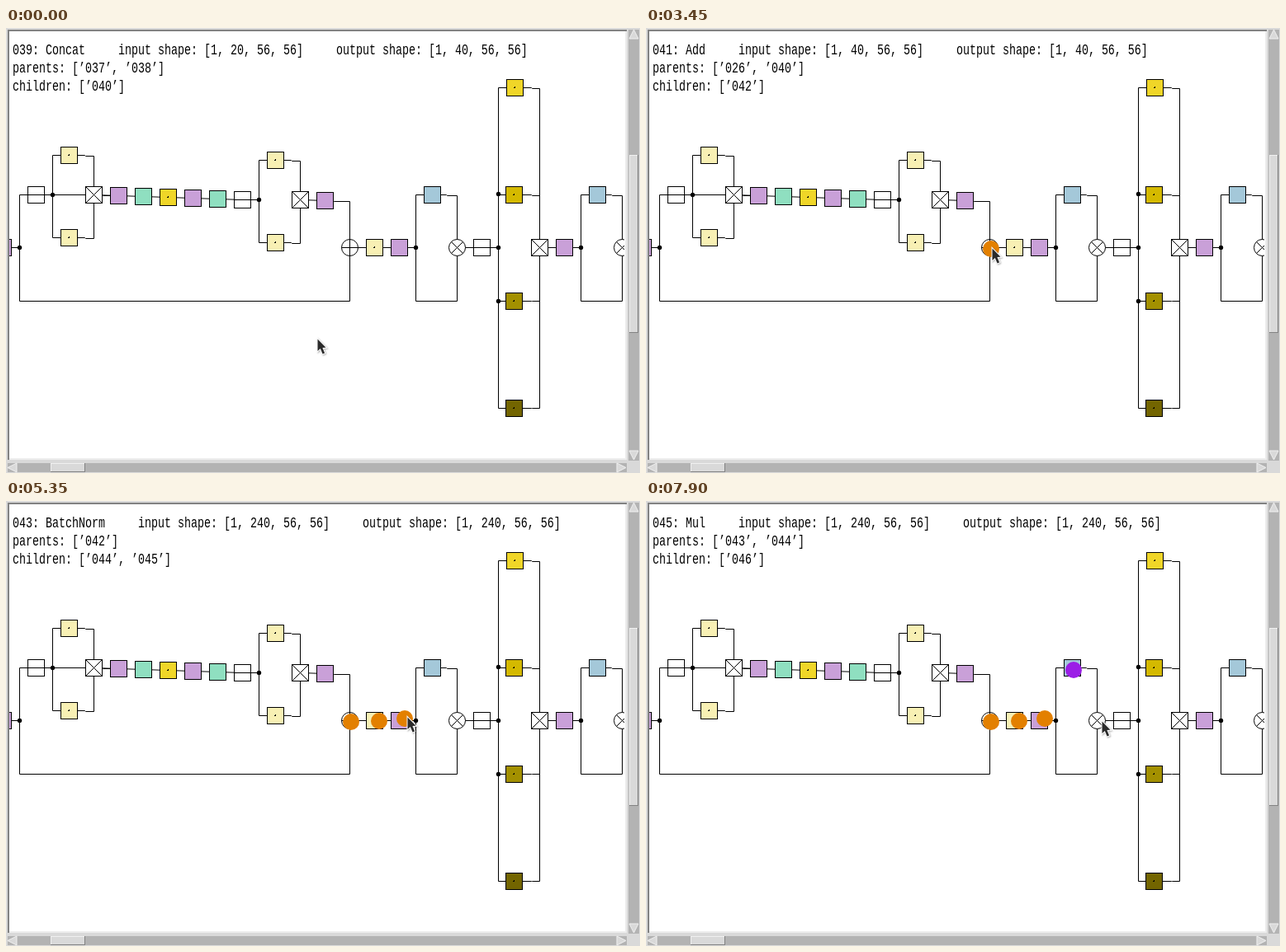
Recreate the animation shown at these times as an HTML page with a canvas. Size 768 by 540 pixels, loop 8000 ms.

```html
<!DOCTYPE html>
<html lang="en">
<head>
<meta charset="utf-8">
<title>Network graph viewer</title>
<style>
html, body { margin: 0; width: 100%; height: 100%; overflow: hidden; background: #d9d9d9; }
canvas { display: block; }
</style>
</head>
<body>
<canvas id="stage" width="768" height="540"></canvas>
<script>
const ctx = document.getElementById('stage').getContext('2d');
const LOOP = 8000, STEP = 50;
const ORANGE = '#e38000', VIOLET = '#9b1ee6';
const PALE = '#f8f0b4', GOLD = '#f0d628', PURPLE = '#c9a0d8', GREEN = '#8fdfc0', BLUE = '#a4c8d9';

const layers = {
  '039': { op: 'Concat', from: ['037', '038'], to: ['040'], cin: 20, cout: 40 },
  '041': { op: 'Add', from: ['026', '040'], to: ['042'], cin: 40, cout: 40 },
  '042': { op: 'Conv', k: '[1, 1]', from: ['041'], to: ['043'], cin: 40, cout: 240 },
  '043': { op: 'BatchNorm', from: ['042'], to: ['044', '045'], cin: 240, cout: 240 },
  '044': { op: 'Sigmoid', from: ['043'], to: ['045'], cin: 240, cout: 240 },
  '045': { op: 'Mul', from: ['043', '044'], to: ['046'], cin: 240, cout: 240 }
};

// What the top left corner shows: a layer id or the chosen marker colour
const header = [
  [0, '039'], [400, ORANGE], [2800, '041'], [3750, '042'],
  [4800, '043'], [5950, VIOLET], [7050, '044'], [7800, '045']
];

const marks = [
  [3000, 418, 268, ORANGE], [4150, 452, 267, ORANGE],
  [5200, 483, 264, ORANGE], [7150, 518, 205, VIOLET]
];

// Pointer path: time, x, y
const path = [
  [0, 377, 377], [2100, 377, 377], [2400, 419, 338], [2650, 423, 296], [2900, 418, 266],
  [3400, 418, 266], [3700, 433, 273], [4000, 452, 265], [4100, 452, 265], [4250, 449, 263],
  [4450, 449, 263], [5200, 483, 263], [5350, 486, 262], [5650, 489, 313], [6300, 489, 313],
  [6850, 499, 252], [7150, 518, 204], [7300, 516, 202], [7400, 516, 202], [7900, 552, 267], [8000, 552, 267]
];

function slope(i, axis) {
  const a = path[i - 1], b = path[i], c = path[i + 1];
  if (!a || !c) return 0;
  const held = (p, q) => p[1] === q[1] && p[2] === q[2];
  return held(a, b) || held(b, c) ? 0 : (c[axis] - a[axis]) / (c[0] - a[0]);
}

function pointerAt(t) {
  let i = 0;
  while (i < path.length - 2 && path[i + 1][0] <= t) i++;
  const a = path[i], b = path[i + 1], d = b[0] - a[0], u = (t - a[0]) / d;
  const u2 = u * u, u3 = u2 * u;
  return [1, 2].map(n =>
    (2 * u3 - 3 * u2 + 1) * a[n] + (u3 - 2 * u2 + u) * d * slope(i, n) +
    (3 * u2 - 2 * u3) * b[n] + (u3 - u2) * d * slope(i + 1, n));
}

function rect(color, x, y, w, h) {
  ctx.fillStyle = color;
  ctx.fillRect(x, y, w, h);
}

function trace(pts) {
  ctx.beginPath();
  for (let i = 0; i < pts.length; i += 2) ctx.lineTo(pts[i], pts[i + 1]);
}

function line(...pts) {
  trace(pts.map(v => v + .5));
  ctx.stroke();
}

function disc(x, y, r, color) {
  ctx.fillStyle = color;
  ctx.beginPath();
  ctx.arc(x, y, r, 0, 7);
  ctx.fill();
}

const joint = (x, y) => disc(x + .5, y + .5, 2.7, '#000');

function box(x, y, color = '#fff') {
  rect(color, x - 10, y - 10, 21, 21);
  ctx.strokeRect(x - 9.5, y - 9.5, 20, 20);
}

function conv(x, y, color) {
  box(x, y, color);
  rect('#000', x - 1, y, 2, 1);
  rect('#000', x, y - 1, 1, 1);
}

function slice(x, y) {
  box(x, y);
  line(x - 10, y, x + 10, y);
}

function cross(x, y, r) {
  line(x - r, y - r, x + r, y + r);
  line(x - r, y + r, x + r, y - r);
}

function concat(x, y) {
  box(x, y);
  cross(x, y, 10);
}

function ring(x, y) {
  ctx.fillStyle = '#fff';
  ctx.beginPath();
  ctx.arc(x + .5, y + .5, 10, 0, 7);
  ctx.fill();
  ctx.stroke();
}

function mul(x, y) {
  ring(x, y);
  cross(x, y, 7);
}

// Split into two convolutions, joined again 50 px further on
function pair(x, y) {
  line(x + 20, y - 48, x, y - 48, x, y + 52, x + 20, y + 52);
  line(x + 20, y - 48, x + 39, y - 48, x + 40, y - 47, x + 50, y - 47, x + 50, y + 53, x + 40, y + 53, x + 39, y + 52, x + 20, y + 52);
  joint(x, y);
  conv(x + 20, y - 48, PALE);
  conv(x + 20, y + 52, PALE);
  concat(x + 50, y);
}

// Sigmoid gate multiplied with its own input
function gate(x) {
  line(x + 20, 202, x, 202, x, 331, x + 50, 331, x + 50, 203, x + 38, 203, x + 37, 202, x + 20, 202);
  joint(x, 266);
  box(x + 20, 202, BLUE);
  mul(x + 50, 266);
}

function graph() {
  ctx.strokeStyle = '#000';
  ctx.lineWidth = 1;
  line(0, 266, 16, 266);
  box(-4, 266, PURPLE);
  line(26, 202, 16, 202, 16, 331, 416, 331, 416, 210, 397, 210, 396, 209, 386, 209);
  joint(16, 266);
  line(36, 202, 106, 202, 136, 203);
  slice(36, 202);
  pair(56, 202);
  line(117, 203, 136, 203, 166, 204, 196, 205, 226, 206, 256, 207, 286, 208, 306, 208);
  [PURPLE, GREEN, GOLD, PURPLE, GREEN].forEach((c, i) =>
    (c === GOLD ? conv : box)(136 + 30 * i, 203 + i, c));
  slice(286, 208);
  line(356, 208, 386, 209);
  pair(306, 208);
  box(386, 209, PURPLE);

  line(416, 266, 496, 266);
  ring(416, 266);
  line(406, 266, 426, 266);
  line(416, 256, 416, 276);
  conv(446, 266, PALE);
  box(476, 266, PURPLE);
  line(546, 266, 596, 266);
  gate(496);
  slice(576, 266);

  line(596, 72, 596, 461);
  line(646, 73, 646, 461);
  [[72, GOLD], [202, '#d4b900'], [331, '#a39000'], [461, '#736500']].forEach(([y, c], i) => {
    const drop = i < 2 ? 1 : 0;
    line(596, y, 636, y, 637, y + drop, 646, y + drop);
    conv(i ? 615 : 616, y, c);
  });
  [201, 266, 331].forEach(y => joint(596, y));
  line(646, 266, 696, 266);
  concat(646, 266);
  box(676, 266, PURPLE);
  gate(696);
}

function bevel(x, y, w, h) {
  rect('#828282', x, y, w, h);
  rect('#f0f0f0', x, y, w - 1, h - 1);
  rect('#d9d9d9', x + 1, y + 1, w - 2, h - 2);
}

function arrow(x, y, turn) {
  ctx.save();
  ctx.translate(x, y);
  ctx.rotate(turn * Math.PI / 2);
  trace([0, -6, 5.5, 5, -5.5, 5]);
  ctx.closePath();
  ctx.fillStyle = '#d9d9d9';
  ctx.fill();
  ctx.strokeStyle = '#f0f0f0';
  ctx.stroke();
  ctx.restore();
}

function frame() {
  rect('#d9d9d9', 0, 0, 768, 540);
  rect('#828282', 2, 2, 750, 522);
  rect('#ededed', 4, 4, 748, 520);
  rect('#fff', 4, 4, 746, 518);
  rect('#b3b3b3', 754, 2, 13, 523);
  rect('#b3b3b3', 2, 528, 750, 11);
  ctx.lineWidth = 1;
  arrow(760.5, 8, 0);
  arrow(760.5, 518, 2);
  arrow(8, 533.5, 3);
  arrow(745, 533.5, 1);
  bevel(755, 154, 11, 216);
  bevel(54, 528, 42, 11);
}

function text(str, y) {
  ctx.save();
  ctx.translate(8, y);
  ctx.scale(1, 1.34);
  ctx.fillText(str, 0, 0);
  ctx.restore();
}

function describe(id) {
  const l = layers[id], gap = ' '.repeat(5);
  const names = list => '[' + list.map(n => `’${n}’`).join(', ') + ']';
  const shape = c => `[1, ${c}, 56, 56]`;
  const parts = [`${id}: ${l.op}`];
  if (l.k) parts.push('k: ' + l.k);
  parts.push('input shape: ' + shape(l.cin), 'output shape: ' + shape(l.cout));
  ctx.fillStyle = '#000';
  ctx.font = '13.33px "Liberation Mono", monospace';
  text(parts.join(gap), 32);
  text('parents: ' + names(l.from), 54);
  text('children: ' + names(l.to), 76);
}

function pointer(x, y) {
  ctx.save();
  ctx.translate(Math.round(x) + .5, Math.round(y) + .5);
  trace([0, 0, 0, 14.5, 3.3, 11.6, 6, 18, 8.6, 17, 5.9, 10.6, 10, 10.3]);
  ctx.closePath();
  ctx.shadowColor = 'rgba(0,0,0,.3)';
  ctx.shadowBlur = 2;
  ctx.shadowOffsetX = ctx.shadowOffsetY = 1;
  ctx.strokeStyle = '#fff';
  ctx.lineWidth = 2;
  ctx.stroke();
  ctx.shadowColor = 'transparent';
  ctx.fillStyle = '#2b2b2b';
  ctx.fill();
  ctx.restore();
}

function draw(now) {
  const t = Math.floor(now % LOOP / STEP) * STEP;
  frame();
  ctx.save();
  ctx.beginPath();
  ctx.rect(4, 4, 745, 518);
  ctx.clip();
  graph();
  for (const [at, x, y, c] of marks) if (t >= at) disc(x, y, 10, c);
  const shown = header.filter(h => h[0] <= t).pop()[1];
  if (layers[shown]) describe(shown);
  else disc(19, 19.5, 10, shown);
  pointer(...pointerAt(t));
  ctx.restore();
}

const start = performance.now();
function tick() {
  draw(performance.now() - start);
  requestAnimationFrame(tick);
}
tick();
</script>
</body>
</html>
```
